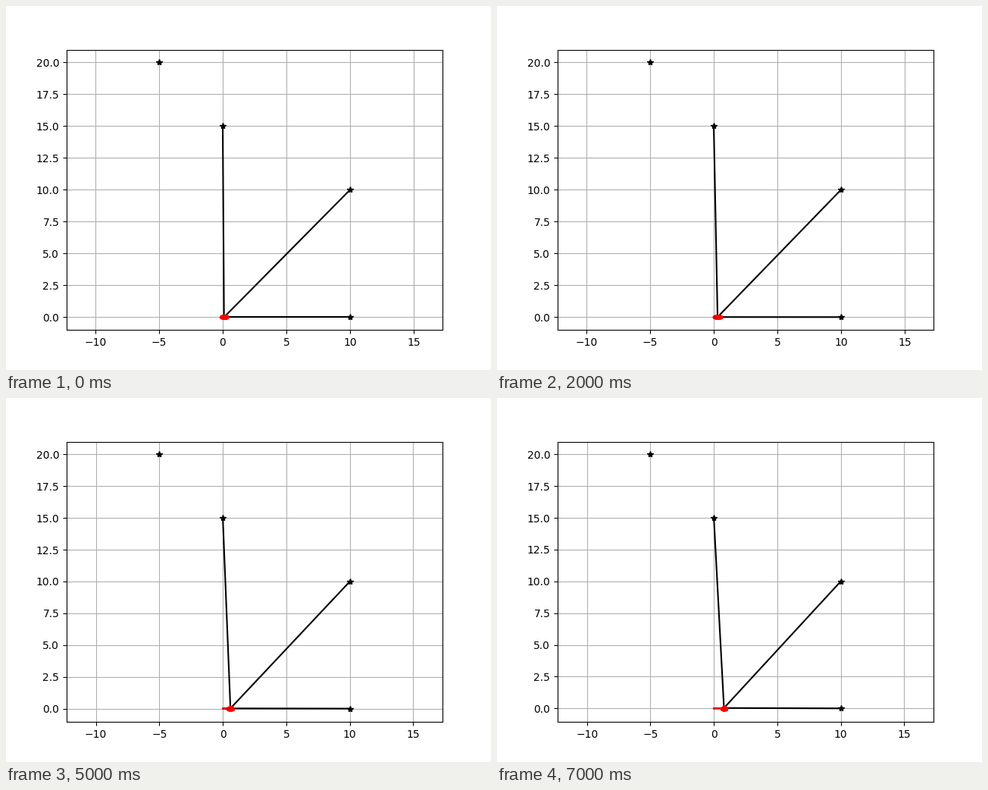
Recreate the animation shown at these times as a matplotlib script. Size 640x480 px, loop 8000 ms.

```python
import numpy as np
import matplotlib.pyplot as plt
from matplotlib.animation import FuncAnimation

STEPS = 8
DT = 0.1
SPEED, YAW_RATE = 1.0, 0.1
MAX_RANGE = 20.0
LANDMARKS = np.array([[10, 0], [10, 10], [0, 15], [-5, 20]], float)


def true_path():
    yaw = YAW_RATE * DT * np.arange(STEPS)
    x = np.cumsum(SPEED * DT * np.cos(yaw))
    y = np.cumsum(SPEED * DT * np.sin(yaw))
    return np.vstack([np.r_[0, x], np.r_[0, y]])


def unit_noise(rng, n):
    """Bell-shaped noise scaled to fill -1..1."""
    s = rng.normal(size=n)
    return 2 * (s - s.min()) / np.ptp(s) - 1


def particles(step, centre):
    """Cloud that spreads on even steps and is resampled on odd ones."""
    rng = np.random.RandomState(20 + step)
    if step % 2 == 0:
        n, half = 100, 0.22 + 0.018 * step
    else:
        n, half = 40, 0.17
    # Sideways drift builds up with the heading error, then levels off
    drift = 0.00318 * min(step, 6) ** 1.7
    return centre + half * unit_noise(rng, n), drift * unit_noise(rng, n)


TRUE = true_path()
DEAD = TRUE * [[0.97], [1.0]]
ESTIMATE = TRUE * [[1.01], [0.7]]

fig, ax = plt.subplots(figsize=(6.4, 4.8), dpi=100)


def draw(step):
    ax.cla()
    n = step + 2
    px, py = TRUE[:, n - 1]
    for lx, ly in LANDMARKS:
        if np.hypot(lx - px, ly - py) <= MAX_RANGE:
            ax.plot([px, lx], [py, ly], "-k")
    ax.plot(LANDMARKS[:, 0], LANDMARKS[:, 1], "*k")

    x, y = particles(step, px)
    ax.plot(x, y, ".r")
    for path, style in ((TRUE, "-b"), (DEAD, "-k"), (ESTIMATE, "-r")):
        ax.plot(path[0, :n], path[1, :n], style)

    # Covariance ellipse around the estimate
    t = np.linspace(0, 2 * np.pi, 60)
    ex, ey = ESTIMATE[:, n - 1]
    ax.plot(ex + x.std() * np.cos(t), ey + y.std() * np.sin(t), "--r")

    ax.axis("equal")
    ax.grid(True)
    return []


anim = FuncAnimation(fig, draw, frames=STEPS, init_func=lambda: [],
                     interval=1000, repeat=True, repeat_delay=0, blit=False)
plt.show()
```
